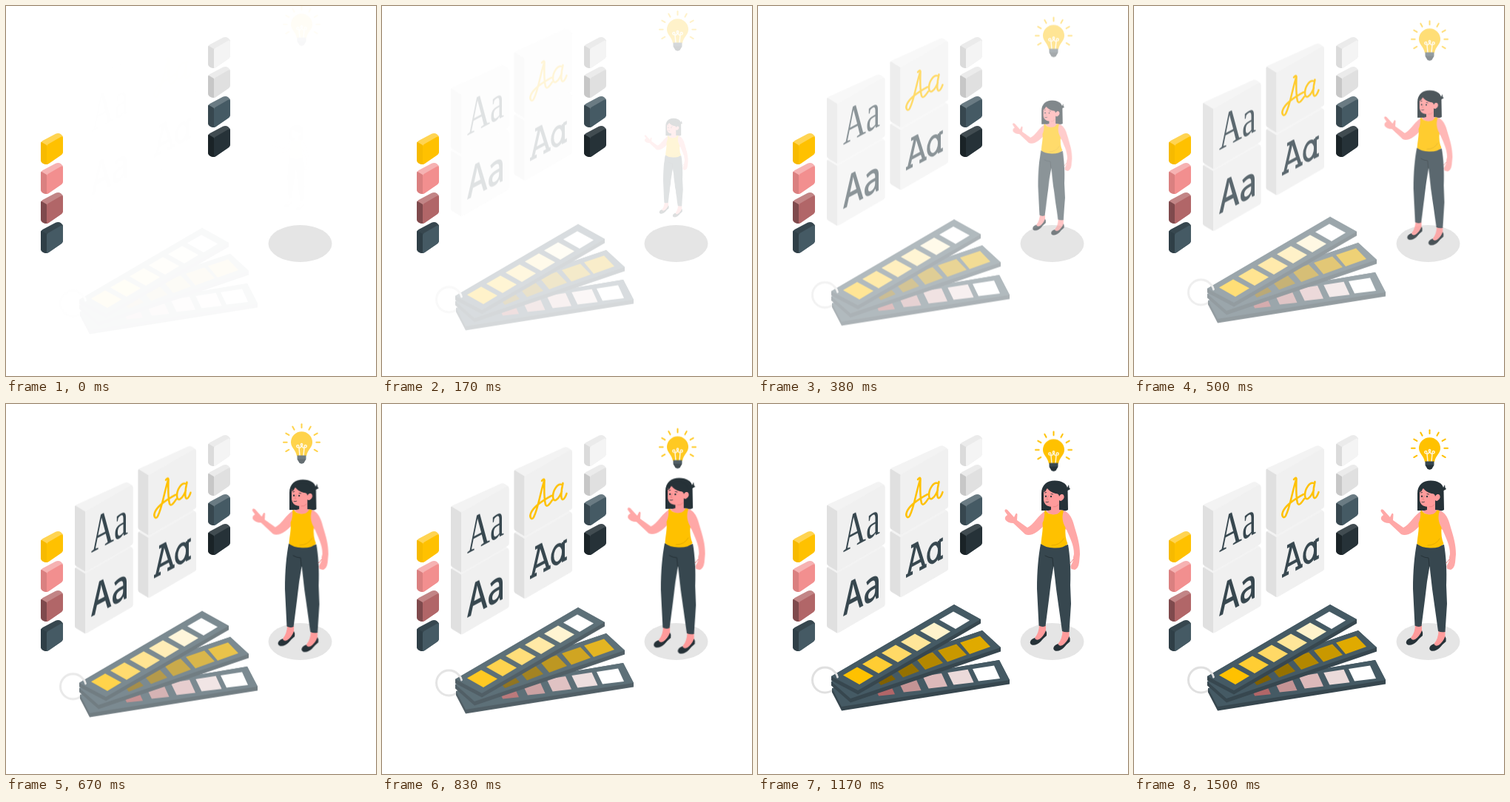
These frames come from a looping animation (500 px wide and 500 px high, 1540 ms). An HTML page:

```html
<!DOCTYPE html>
<html lang="en">
<head>
<meta charset="utf-8">
<title>Design palette</title>
<style>
  html, body { margin: 0; width: 100%; height: 100%; overflow: hidden; background: #fff; }
  svg { display: block; width: 100%; height: 100%; }
  .cards, .woman, .fan, .bulb { animation: 1.54s linear infinite; }
  .cards { animation-name: drop; }
  .woman { animation-name: zoom; transform-origin: 384px 218.5px; }
  .fan { animation-name: rise; }
  .bulb { animation-name: hover; }

  @keyframes drop {
    0% { opacity: .004; transform: translateY(-29.9px); animation-timing-function: cubic-bezier(.345, .086, .498, 1.368); }
    62.4%, 100% { opacity: 1; transform: translateY(0); }
  }
  @keyframes zoom {
    0% { opacity: .004; transform: scale(.502); animation-timing-function: cubic-bezier(.345, .086, .498, 1.368); }
    62.4%, 100% { opacity: 1; transform: scale(1); }
  }
  @keyframes rise {
    0% { opacity: .038; transform: translateY(28.9px); }
    62.4%, 100% { opacity: 1; transform: translateY(0); }
  }
  @keyframes hover {
    0% { opacity: .038; transform: translateY(-38.9px); }
    62.4% { opacity: 1; transform: translateY(-.4px); }
    100% { opacity: 1; transform: translateY(-4.26px); }
  }

  .ink { fill: #37474f; }
  .skin { fill: #ff9b9b; }
  .arm { fill: #ffa8a7; }
  .hair { fill: #263238; }
  .line { fill: none; stroke-linecap: round; stroke-linejoin: round; }
  .serif { font: 68px "Liberation Serif", serif; }
  .sans { font: 600 59px "Open Sans", sans-serif; }
</style>
</head>
<body>
<svg viewBox="0 0 500 500">
  <defs>
    <g id="tile">
      <path fill="var(--top)" d="M0 14Q0 11.500 2.500 10L20 .8Q24 -1 27.500 1.500Q30 3.300 30 6V24.500Q30 28 27 29.800L11 40.800Q7.500 43 4 41.300Q0 39.500 0 36Z"/>
      <path fill="var(--side)" d="M0 36V14Q0 12 .8 11.700L8 16V42Q6 42.200 4 41.300Q0 39.500 0 36Z"/>
      <path fill="var(--face)" d="M8 42V18Q8 16 10 14.800L26 5.500Q30 3.300 30 6.500V24.500Q30 28 27 29.800L11 40.800Q9.500 42 8 42Z"/>
    </g>
    <g id="card">
      <path fill="#f3f3f3" d="M93 138.500q0-2 2-3L160 106Q163 104.500 165.500 106L169.500 108.500Q171.500 109.700 171.500 112V187Q171.500 189 169.500 190L110 224.500Q107 226 105 224.500L95 218.500Q93 217.500 93 215.500Z"/>
      <path fill="#e0e0e0" d="M93 138.500Q93 137 94 136.700L107 144.600V225.500Q106 225.300 105 224.500L95 218.500Q93 217.500 93 215.500Z"/>
      <path fill="#f0f0f0" d="M107 225.500V147Q107 145 109 144L168 110Q171.500 108.500 171.500 112V187Q171.500 189 169.500 190L110 224.500Q108.500 225.500 107 225.500Z"/>
    </g>
    <g id="shoe">
      <path class="skin" d="M380 298L389 299V309Q384 317 376 321L374 316Q380 309 380 298Z"/>
      <path class="hair" d="M389 306Q391 309 390 313Q385 317 382 321Q376 327 370 325.500Q366 323 369 319Q371 317 374 316Q375 320 380 318Q386 314 389 306Z"/>
    </g>
  </defs>

  <g id="tiles"></g>
  <ellipse cx="397.500" cy="321" rx="43" ry="25" fill="#e5e5e5"/>

  <g class="cards">
    <use href="#card" y="84"/>
    <use href="#card"/>
    <use href="#card" x="85.500" y="35.500"/>
    <use href="#card" x="85.500" y="-49"/>
    <text class="serif ink" transform="matrix(.63 -.335 0 1 115 200.500)">Aa</text>
    <text class="sans ink" transform="matrix(.7 -.37 0 1 115 287)">Aa</text>
    <path class="line" stroke="#ffc100" stroke-width="2.500" d="M216 102Q219 98 219.500 101C214 117 211 140 205 151C202 156 199 151 201 146C204 138 216 129 229 122M219.500 101C219 115 219.500 128 221 134C223 138 226 134 230 128M243 107C237 105 231 115 231 123C231 132 238 129 243 116M244.500 105C242 116 241 128 244.500 127C247 126 248.500 122 249.500 119"/>
    <g transform="matrix(.866 -.46 0 1 200 235)" fill="none" stroke="#37474f" stroke-width="4.600">
      <path d="M0-2.300H10.500M21-2.300H32M4.500-3L15-38.500H17L28-3M8-38.500H17M8-13H24M52-27V-2.300H57.500M52-26H57.500"/>
      <ellipse cx="43.500" cy="-14" rx="8.500" ry="12"/>
    </g>
  </g>

  <g class="fan">
    <circle cx="90.500" cy="373" r="17" fill="none" stroke="#e0e0e0" stroke-width="3"/>
    <g id="strips"></g>
    <path class="line" stroke="#e0e0e0" stroke-width="2.800" d="M104.500 363Q107 366 107.500 369"/>
  </g>

  <g class="bulb">
    <g id="rays" class="line" stroke="#ffc100" stroke-width="2"></g>
    <path fill="#ffc100" d="M385 63.800a14.500 14.500 0 0 1 29 0c0 7-6.500 10-8 18.500h-13c-1.500-8.500-8-11.500-8-18.500z"/>
    <path class="line" stroke="#fff6dc" stroke-width="1.500" d="M397 82L396 71Q392 71 393 68Q396 66 396 71M402 82L403 71Q407 71 406 68Q403 66 403 71M396 71Q398 72 399 69Q397.500 66 399.500 65.500Q401.500 66 400 69Q401 72 403 71"/>
    <path class="ink" d="M393.500 81.500H405.500V86Q405.500 88 404 88.500L402.500 91.500Q399.500 93.500 396.500 91.500L395 88.500Q393.500 88 393.500 86Z"/>
    <path class="hair" d="M394.500 86.500H404.500V88L402.500 91.500Q399.500 93.500 396.500 91.500L394.500 88Z"/>
  </g>

  <g class="woman">
    <path class="hair" d="M383 144V121C383 109 391 103.500 401 103.500C411 103.500 417 108 418 113L420 109L420.500 113L422 115L418.500 117L419 143Q415 145.500 408 144Z"/>
    <use href="#shoe"/>
    <use href="#shoe" x="31.500" y="8"/>
    <path class="ink" d="M382 189Q400 196 419 190C421.500 204 423 225 422 245L423 270L420.500 308Q415 309 411 307L403 250L399.500 219L396 240L393 265L388.500 300Q384 302 379.500 299.500L377 250C377 225 379 205 382 189Z"/>
    <path class="line" stroke="#263238" d="M388 205Q393 208 398 208L399 219"/>
    <path class="arm" d="M390 143.500C380 148 372 164 364 167L350 157L350.500 149Q349 146 347.500 150L346 153L337 143Q333 141 333.500 145L337 150Q333 152 334 156Q337 161 345 161L361 176C368 180 380 173 390 160Z"/>
    <path class="arm" d="M407 143C420 143 425 154 428 167C432 180 435 190 435 203L434 214Q433 222 428 224L423.500 223C420 217 427 216 426 207L427 203C427 190 421 180 417 170L408 164Z"/>
    <path class="line" stroke="#ee8585" d="M422 215L426 210"/>
    <path class="skin" d="M396 134H407V143L411 145Q401 155 389 145L396 143Z"/>
    <path fill="#ffc100" d="M388.500 143.800C393 151 406 152 409.500 143.300L413 144.500C410.500 152 411 159 415.500 167Q414.500 180 418.500 189Q413 195 400 194.500Q388 194 382.500 189C383 180 385.500 170 384.500 161Q388 153 387 145Z"/>
    <path class="line" stroke="#e6ad00" d="M397 191Q408 191 413 182"/>
    <path class="skin" d="M386 117Q395 110 406 118L407 124Q410 120 413 123Q415 127 411 130Q409 132 407 130L407 135Q401 140 394 138.500Q387 137 386 130Z"/>
    <path class="hair" d="M386 119Q387 110 398 108Q412 108 414 122Q409 120 407 125Q407 121 402 121Q394 119 390.500 113Q389 119 386 119Z"/>
    <g class="line" stroke="#263238">
      <path d="M387.500 120l2-.5M396 121.500l2.500 .5M389 132.500q2 .8 3.500 -.2" stroke-width=".8"/>
      <path d="M389 124.500v.5M396 124.800v.5" stroke-width="2"/>
    </g>
    <path class="line" stroke="#e57f7f" stroke-width=".8" d="M392 124L390 129H392M399 139Q403 140 406 136"/>
  </g>
</svg>
<script>
  const add = (id, html) => document.getElementById(id).insertAdjacentHTML('beforeend', html);
  const poly = (pts, fill) => `<polygon points="${pts.join(' ')}" fill="${fill}"/>`;

  // Colour columns: face, top, side
  function column(x, y, colours) {
    colours.forEach(([face, top, side], i) => add('tiles',
      `<use href="#tile" x="${x}" y="${y + i * 40}" style="--face:${face};--top:${top};--side:${side}"/>`));
  }
  column(47, 172, [
    ['#ffc100', '#ffd452', '#f7ba00'],
    ['#f28f8f', '#f6b2b2', '#da8080'],
    ['#b16668', '#c28586', '#7f4a4d'],
    ['#455a64', '#37474f', '#2f3f47']
  ]);
  column(273, 42, [
    ['#f4f4f4', '#ebebeb', '#dbdbdb'],
    ['#e0e0e0', '#ebebeb', '#c7c7c7'],
    ['#455a64', '#6a7b83', '#37474f'],
    ['#263238', '#414c51', '#1a2327']
  ]);

  // Corners run left, top, right, bottom.
  // Windows shrink along the strip: their left and right ends take different steps.
  function strip([l, t, r, b], win, stepL, stepR, colours) {
    const down = ([x, y]) => [x, y + 5.5];
    let out = poly([l, t, r, down(r), down(b), down(l)], '#37474f') + poly([l, t, r, b], '#455a64');
    colours.forEach((c, i) => {
      out += poly(win.map(([x, y], k) => {
        const [dx, dy] = k === 1 || k === 2 ? stepR : stepL;
        return [x + dx * i, y + dy * i];
      }), c);
    });
    add('strips', out);
  }
  strip([[100, 384], [326, 346], [340, 373], [113, 409]],
    [[290, 358], [319, 353.5], [327, 371], [298, 374.5]], [-33.7, 5], [-35.5, 5.3],
    ['#fff', '#ebdada', '#dcb9ba', '#c49495', '#b16668']);
  strip([[99, 375], [303, 306], [328, 329], [125, 398]],
    [[273, 322.5], [300, 313.5], [314, 328], [286, 338]], [-30, 10.5], [-32, 11],
    ['#e0aa00', '#c99800', '#b38700', '#957100', '#806000']);
  strip([[99, 368], [265, 271], [301, 291], [135, 387]],
    [[245, 291.5], [264, 280.5], [286, 292.5], [267, 304]], [-26, 15], [-26, 15],
    ['#fff', '#fff3cc', '#ffe699', '#ffd966', '#ffcd33', '#ffc100']);

  for (let a = -120; a <= 120; a += 30) {
    add('rays', `<path d="M399.500 44V39.300" transform="rotate(${a} 399.500 63.800)"/>`);
  }
</script>
</body>
</html>
```
